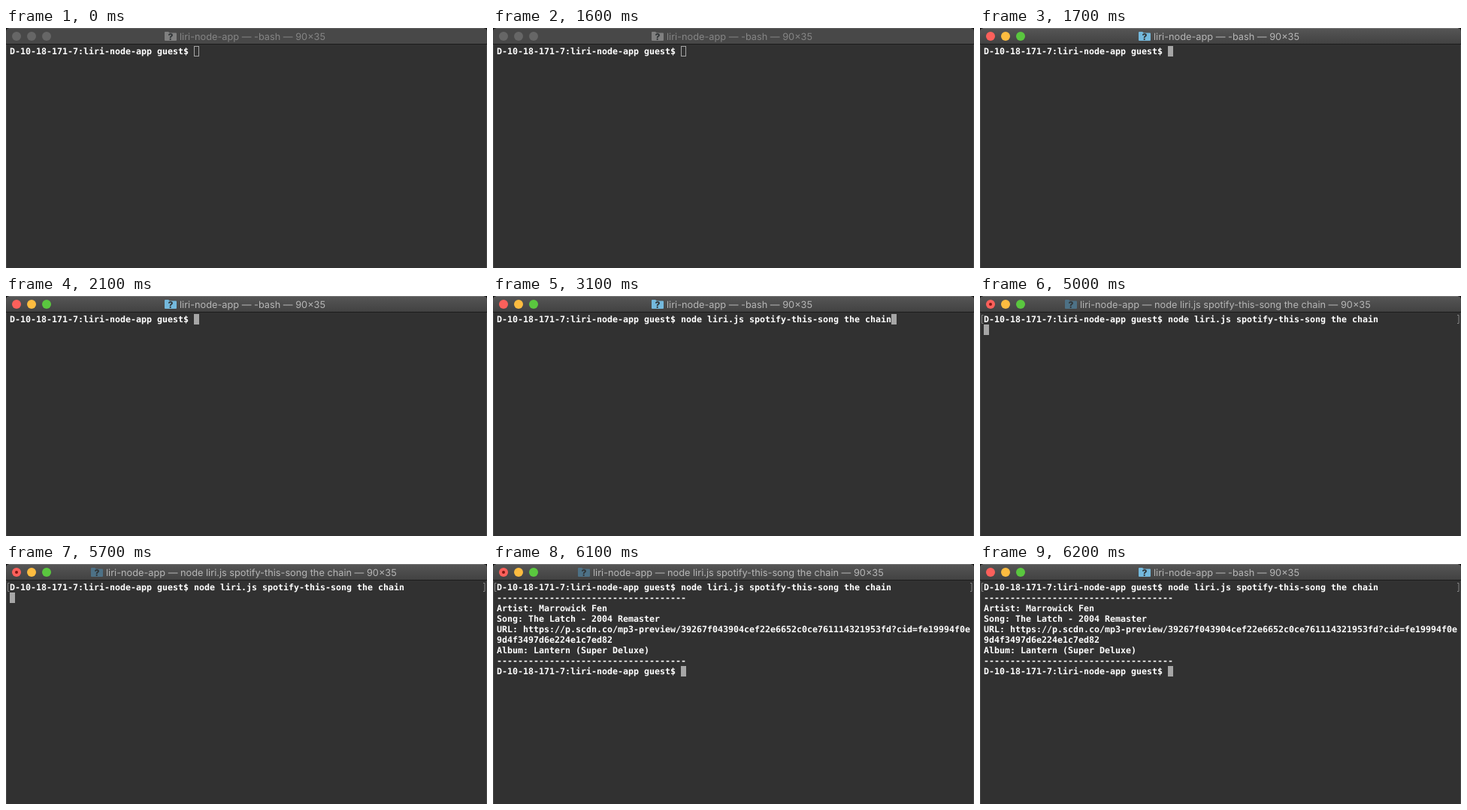
An HTML page that plays this animation: 640 by 320 pixels, repeating every 8000 ms.

```html
<!DOCTYPE html>
<html lang="en">
<head>
<meta charset="utf-8">
<title>Terminal</title>
<style>
  html, body { margin: 0; width: 100%; height: 100%; overflow: hidden; background: #313131; }
  svg { display: block; width: 640px; height: 320px; }
  text { white-space: pre; text-rendering: geometricPrecision; }
  #rows { font: bold 11.63px "DejaVu Sans Mono", monospace; fill: #fff; }
  #title { font: 12.75px Inter, sans-serif; }
  #brackets { fill: none; stroke: #858585; }
</style>
</head>
<body>
<svg viewBox="0 0 640 320">
  <defs>
    <linearGradient id="bar" x2="0" y2="1">
      <stop stop-color="#565656"/><stop offset="1" stop-color="#424242"/>
    </linearGradient>
  </defs>
  <rect width="640" height="22" fill="#111"/>
  <path id="top" d="M0 21V5Q0 0 5 0H635Q640 0 640 5V21Z"/>
  <path id="shine" d="M4 .5H636" stroke="#777"/>
  <path d="M0 21.5H640" stroke="#1c1c1c"/>
  <path d="M.5 22V320M639.5 22V320" stroke="#484848"/>
  <g id="lights">
    <circle cx="14" cy="11" r="6"/><circle cx="34" cy="11" r="6"/><circle cx="54" cy="11" r="6"/>
  </g>
  <circle id="busy" cx="14" cy="11" r="2" fill="#7d1712"/>
  <g id="icon">
    <path id="folder" d="M0 1Q0 0 1 0H5L7 1.5H15Q16 1.5 16 2.5V11Q16 12 15 12H1Q0 12 0 11Z"/>
    <text x="8" y="11" text-anchor="middle" font-family="Inter, sans-serif" font-weight="800" font-size="12" fill="#303436">?</text>
  </g>
  <text id="title" y="16"></text>
  <g id="rows"></g>
  <path id="brackets" d="M4.5 25.5H2.5V36.5H4.5M635 25.5H637V36.5H635"/>
  <rect id="cursor"/>
</svg>
<script>
const $ = id => document.getElementById(id);
const set = (el, attrs) => { for (const k in attrs) el.setAttribute(k, attrs[k]); };

const LOOP = 8000, FOCUS = 1700, TYPED = 3000, ENTER = 4900, RUN = 5000, OUTPUT = 6100, DONE = 6200;
const CELL = 7, LINE = 14;
const prompt = "D-10-18-171-7:liri-node-app guest$ ";
const command = "node liri.js spotify-this-song the chain";
const rule = "-".repeat(36);
const output = [
  rule,
  "Artist: Marrowick Fen",
  "Song: The Latch - 2004 Remaster",
  "URL: https://p.scdn.co/mp3-preview/39267f043904cef22e6652c0ce761114321953fd?cid=fe19994f0e",
  "9d4f3497d6e224e1c7ed82",
  "Album: Lantern (Super Deluxe)",
  rule,
  prompt
];

const rows = Array.from({ length: 9 }, (_, i) => {
  const row = document.createElementNS("http://www.w3.org/2000/svg", "text");
  set(row, { x: 5, y: 35 + i * LINE });
  return $("rows").appendChild(row);
});

function linesAt(t) {
  if (t < TYPED) return [prompt];
  if (t < ENTER) return [prompt + command];
  return [prompt + command, ...(t < OUTPUT ? [""] : output)];
}

function draw(t) {
  const active = t >= FOCUS, running = t >= RUN && t < DONE;
  const lines = linesAt(t), last = lines.length - 1;
  rows.forEach((row, i) => row.textContent = lines[i] || "");

  const inset = active ? 0 : 0.5;
  set($("cursor"), {
    x: 5 + lines[last].length * CELL + inset, y: 24 + last * LINE + inset,
    width: CELL - 2 * inset, height: LINE - 2 * inset,
    fill: active ? "#a6a6a6" : "none", stroke: active ? "none" : "#a6a6a6"
  });
  set($("brackets"), { opacity: t < ENTER ? 0 : 1 });

  const left = running ? 133 : 231;
  $("title").textContent = `liri-node-app — ${running ? command : "-bash"} — 90×35`;
  set($("title"), { x: left, fill: active ? "#b6b6b6" : "#858585" });
  set($("icon"), { transform: `translate(${left - 20} 5)` });
  set($("folder"), { fill: !active ? "#808080" : running ? "#4d7186" : "#74b9dd" });

  set($("top"), { fill: active ? "url(#bar)" : "#484848" });
  set($("shine"), { opacity: active ? 1 : 0.5 });
  const colors = active ? ["#fc605b", "#fdbc40", "#5ac73f"] : ["#666", "#666", "#666"];
  [...$("lights").children].forEach((light, i) => set(light, { fill: colors[i] }));
  set($("busy"), { opacity: running ? 1 : 0 });
}

function tick() {
  draw(performance.now() % LOOP);
  requestAnimationFrame(tick);
}
tick();
</script>
</body>
</html>
```
